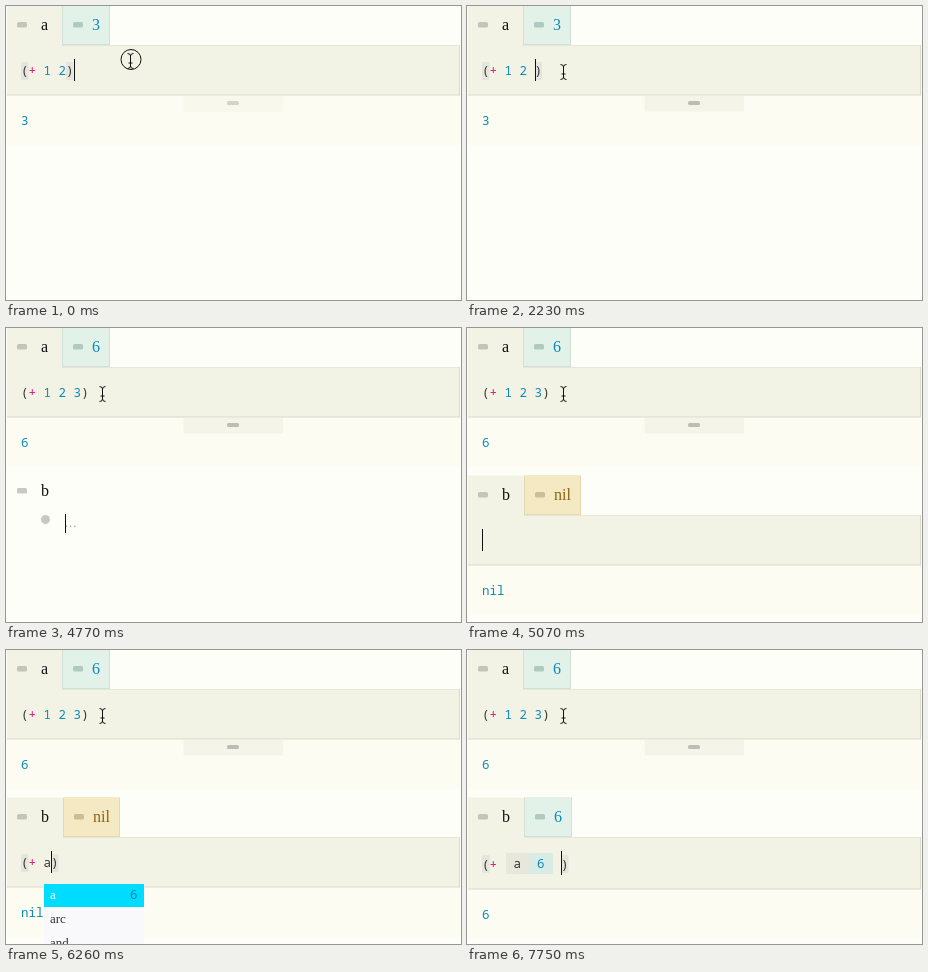
Write an HTML page that moves like this. It is 455x294 px and loops after 8 s.

```html
<!DOCTYPE html>
<html lang="en">
<head>
<meta charset="utf-8">
<title>Live code cells</title>
<style>
  html, body { margin: 0; width: 100%; height: 100%; overflow: hidden; background: #fefef8; }
  svg { display: block; width: 455px; height: 294px; }
  text { white-space: pre; }
  .label { font: 16px "Liberation Serif", serif; }
  .item { font: 13px "Liberation Serif", serif; }
  .code { font: 12.5px "Noto Sans Mono", monospace; }
</style>
</head>
<body>
<svg id="stage" viewBox="0 0 455 294"></svg>
<script>
const LOOP = 8000;
const BLUE = '#0b8ab8', INK = '#333', PANEL = '#f3f3e5', EDGE = '#dadacd';
const ADVANCE = 7.5, LEFT = 15;
const stage = document.getElementById('stage');

const rect = (x, y, w, h, fill, rx = 0) =>
  `<rect x="${x}" y="${y}" width="${w}" height="${h}" rx="${rx}" fill="${fill}"/>`;
const text = (x, y, content, kind, fill) =>
  `<text x="${x}" y="${y}" class="${kind}" fill="${fill}">${content}</text>`;
const pill = (x, y, fill) => rect(x, y, 10, 5.5, fill, 1.5);
const caret = (x, y, h) => rect(x, y, 1, h, '#111');

// The entry that is current at time t in a list of [start, value] pairs.
const at = (t, steps) => steps.findLast(([start]) => t >= start)[1];

function code(x, y, source) {
  const colour = c => /\d/.test(c) ? BLUE : c === '+' ? '#df1278' : INK;
  const spans = [...source].map(c => `<tspan fill="${colour(c)}">${c}</tspan>`).join('');
  return text(x, y, spans, 'code', INK);
}

const bracketMarks = (xs, y) => xs.map(x => rect(x, y, 7.5, 18, '#e6e5dd', 1)).join('');

const textWidth = { nil: 17, '()': 10.7 };

// Name tab, value tab, editor and result panel; top is where the tabs meet the editor.
function cell(name, value, top, tabHeight, valueX, editorHeight = 50) {
  const isNil = value === 'nil';
  const width = 38 + (textWidth[value] || 8);
  const tabTop = top - tabHeight;
  const bottom = top + editorHeight;
  const labelY = top - 16;
  return rect(1, bottom, 453, 49, '#fcfcf2')
    + rect(1, tabTop, valueX - 1, tabHeight, PANEL)
    + rect(valueX - 1, tabTop, width + 2, tabHeight - .5, isNil ? '#e5d9b3' : '#d2e1d8')
    + rect(valueX, tabTop, width, tabHeight - 1.5, isNil ? '#f5e9c3' : '#e3f2e9')
    + rect(1, top - .5, 453, editorHeight + .5, EDGE)
    + rect(1, top, 452, editorHeight - 1, PANEL)
    + rect(1, top - .5, valueX - 2, 1, PANEL)
    + pill(11, labelY - 7.5, '#c4c4b9')
    + text(35, labelY, name, 'label', '#111')
    + pill(valueX + 10, labelY - 7.5, isNil ? '#cdbd94' : '#b0c9c1')
    + text(valueX + 29, labelY, value, 'label', isNil ? '#8a6414' : BLUE)
    + text(LEFT, bottom + 29.5, value, 'code', value === '()' ? INK : BLUE);
}

function cellA(t) {
  const source = at(t, [[0, '(+ 1 2)'], [2230, '(+ 1 2 )'], [2530, '(+ 1 2 3)']]);
  const caretX = at(t, [[0, 68], [150, 0], [740, 68], [1190, 0], [1640, 60],
                        [2230, 68], [2530, 75], [3130, 0]]);
  const closing = LEFT + (source.length - 1) * ADVANCE;
  const hovered = t >= 150;
  return cell('a', t < 2530 ? 3 : 6, 39.5, 39.5, 57)
    + rect(177.5, 90, 99.5, 15.5, hovered ? '#f4f4e9' : '#f8f8ed', 1)
    + rect(221, 95, 12, 4, hovered ? '#bdbdb4' : '#d3d3ca', 1.5)
    + (t < 2530 ? bracketMarks([LEFT, closing], 56) : '')
    + code(LEFT, 69, source)
    + (caretX ? caret(caretX, 53, 22) : '');
}

function outline(t) {
  const grey = '#c8c8c5';
  const dot = (x, y) => `<circle cx="${x}" cy="${y}" r="4.5" fill="${grey}"/>`;
  const emptyLine = (x, y) => text(x - 1, y + 13, '…', 'item', '#999') + caret(x, y, 19);
  const name = t >= 3880 ? text(35, 167.5, 'b', 'label', '#111') : '';
  if (t < 3880) return dot(16, 163) + emptyLine(35, 154);
  if (t < 4320) return dot(16, 163) + name + caret(44, 154, 19);
  if (t < 4770) return dot(16, 163) + name + dot(16, 191.5) + emptyLine(35, 186);
  return pill(11, 160, grey) + name + dot(39.5, 191.5) + emptyLine(59, 186);
}

function popup(x, items, hint = '') {
  const rowHeight = 24;
  return rect(x, 234, 100, items.length * rowHeight - 1, '#f9f9fb')
    + rect(x, 234, 100, 23, '#00dcff')
    + items.map((item, i) =>
        text(x + 6, 249 + i * rowHeight, item, 'item', i ? INK : '#fff')).join('')
    + text(x + 86, 249, hint, 'code', '#0b84b4');
}

function cellB(t) {
  const value = at(t, [[0, 'nil'], [5520, '()'], [5820, 0], [6260, 'nil'], [7010, 6]]);
  const hasToken = t >= 7010;
  let view = cell('b', value, 187.5, 40, 58, hasToken ? 52 : 50);
  if (hasToken) {
    const closing = t < 7750 ? 87 : 94;
    return view + bracketMarks([LEFT, closing], 205)
      + code(LEFT, 218.5, '(+') + code(closing, 218.5, ')')
      + rect(39, 203, 47, 21, '#d9ebe5', 2) + rect(39, 203, 23, 21, '#e7e7dc', 2)
      + code(46.5, 218, 'a') + code(70, 218, '6')
      + (t < 7450 || t >= 7750 ? caret(closing, 201, 24) : '');
  }
  const source = at(t, [[0, ''], [5520, '()'], [5820, '(+)'], [5970, '(+ )'], [6260, '(+ a)']]);
  const closing = LEFT + Math.max(0, source.length - 1) * ADVANCE;
  if (source) view += bracketMarks([LEFT, closing], 204) + code(LEFT, 217, source);
  if (t < 6860) view += caret(Math.floor(closing), 201, 22);
  if (t >= 5820 && t < 5970) view += popup(23, ['+']);
  if (t >= 6260) view += popup(38, ['a', 'arc', 'and'], '6');
  return view;
}

function pointer(t) {
  const [x, y] = at(t, [[0, [124.5, 55]], [150, [108.5, 64.5]], [300, [101.5, 66]], [450, [96.5, 66]]]);
  const ringed = t < 300 || (t >= 1040 && t < 1190);
  const beam = `M${x - 3} ${y - 7.5}q3 0 3 2.5v10q0 2.5 -3 2.5`
    + `M${x + 3} ${y - 7.5}q-3 0 -3 2.5v10q0 2.5 3 2.5M${x - 2} ${y + 2}h4`;
  return `<g fill="none" stroke="#111"><path d="${beam}"/>`
    + (ringed ? `<circle cx="${x + .5}" cy="${y - 1.5}" r="10"/>` : '') + '</g>';
}

let shown = '';
function draw(now) {
  const t = now % LOOP;
  const lower = t < 3430 ? '' : t < 5070 ? outline(t) : cellB(t);
  const view = cellA(t) + lower + pointer(t);
  if (view !== shown) stage.innerHTML = shown = view;
}

const start = performance.now();
function tick() {
  draw(performance.now() - start);
  requestAnimationFrame(tick);
}
tick();
</script>
</body>
</html>
```
